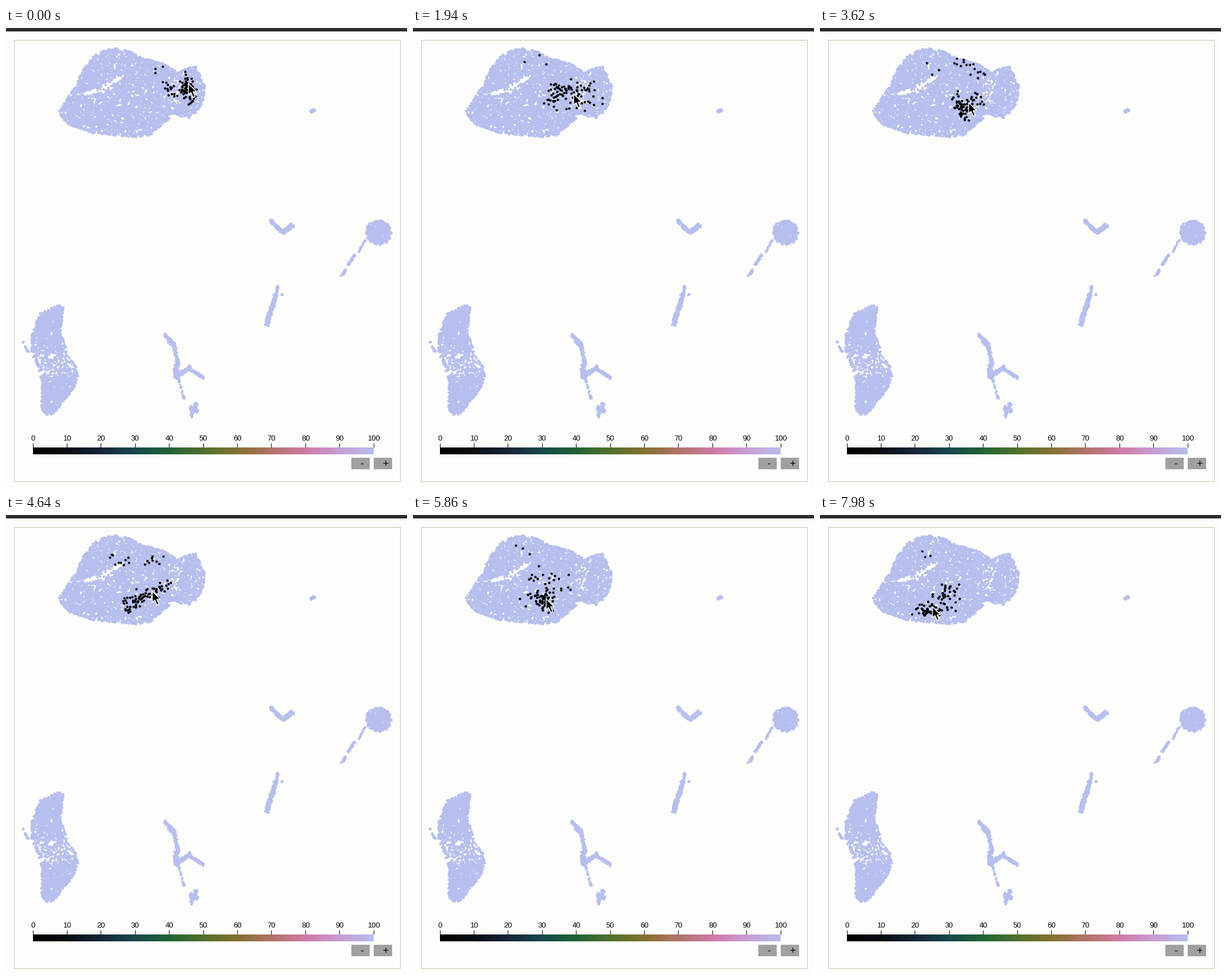
Animation, 699 px wide and 801 px high, one loop 8 s. Source, as a matplotlib script:

```python
import numpy as np
import matplotlib.pyplot as plt
from matplotlib.animation import FuncAnimation
from matplotlib.colors import LinearSegmentedColormap
from matplotlib.patches import Polygon, Rectangle
from matplotlib.path import Path

W, H, DPI = 699, 801, 64
PX = 72 / DPI
LOOP, TICK = 8000, 20
PAPER, CELL = "#fdfdfb", "#b6bfed"

rng = np.random.default_rng(11)


def fill(outline, n, density):
    """Random points inside a polygon, thinned by a density function."""
    pts = np.array(outline, float)
    xy = rng.uniform(pts.min(0), pts.max(0), (n, 2))
    xy = xy[Path(pts).contains_points(xy)]
    return xy[rng.random(len(xy)) < density(xy[:, 0], xy[:, 1])]


def dab(x0, y0, x1, y1, width):
    """Random points along a thick line, as many as its area asks for."""
    n = round(0.3 * width * (np.hypot(x1 - x0, y1 - y0) + 0.8 * width)) + 1
    u = rng.random((n, 1))
    angle = rng.uniform(0, 2 * np.pi, n)
    r = width / 2 * np.sqrt(rng.random(n))
    off = np.c_[r * np.cos(angle), r * np.sin(angle)]
    return (1 - u) * [x0, y0] + u * [x1, y1] + off


def dip(x, y, cx, cy, length, thick, tilt):
    a = np.radians(tilt)
    u = (x - cx) * np.cos(a) + (y - cy) * np.sin(a)
    v = (y - cy) * np.cos(a) - (x - cx) * np.sin(a)
    return np.exp(-((u / length) ** 2 + (v / thick) ** 2) ** 2)


def island_density(x, y):
    gap = dip(x, y, 150, 111, 28, 6, -12) + dip(x, y, 188, 92, 27, 6, -35)
    thin = 0.55 * dip(x, y, 296, 108, 11, 34, 12)
    return 1 - np.clip(0.95 * gap + thin, 0, 0.96)


def left_density(x, y):
    return np.interp(y, [535, 578, 600, 612], [1, 0.3, 0.36, 1])


island = fill(
    [(90, 146), (122, 99), (132, 73), (151, 49), (173, 37), (190, 35), (214, 39),
     (235, 51), (277, 62), (300, 77), (314, 69), (331, 66), (346, 99), (345, 122),
     (335, 145), (318, 157), (292, 151), (250, 187), (222, 190), (150, 183),
     (106, 167)], 8200, island_density)

left = fill(
    [(100, 487), (92, 482), (59, 498), (44, 535), (43, 562), (52, 588), (62, 613),
     (61, 665), (69, 674), (82, 674), (117, 630), (125, 608), (121, 587), (109, 574),
     (95, 530)], 4600, left_density)

strokes = [
    (29, 547, 38, 565, 2), (275, 533, 281, 540, 4), (283, 543, 293, 554, 8),
    (293, 555, 299, 588, 6), (296, 590, 297, 610, 9), (300, 606, 320, 591, 7),
    (318, 594, 344, 610, 5), (300, 612, 311, 650, 2), (331, 655, 322, 677, 6),
    (322, 662, 332, 668, 8), (530, 147, 537, 142, 5), (460, 335, 477, 352, 6),
    (480, 354, 486, 358, 7), (488, 352, 498, 344, 8), (647, 356, 651, 357, 42),
    (625, 370, 614, 392, 2), (608, 396, 596, 412, 4), (591, 422, 585, 432, 4),
    (473, 450, 470, 464, 4), (470, 464, 464, 487, 7), (462, 488, 454, 517, 8),
    (480, 465, 487, 461, 1),
]
cells = np.vstack([island, left] + [dab(*s) for s in strokes])

# Pointer path and, for each stop, the bands in which neighbours are found.
TIMES = np.array([0, 1940, 3620, 4640, 5860, 6880, 7980])
TIPS = np.array([(318, 97), (280, 115), (259, 130), (255, 133),
                 (232, 146), (211, 158), (196, 160)], float)
COUNTS = (50, 28, 16)
BANDS = np.array([
    [(306, 100, 322, 112), (318, 80, 324, 132), (272, 84, 298, 122)],
    [(236, 117, 284, 112), (240, 102, 312, 106), (243, 136, 326, 126)],
    [(240, 132, 256, 148), (236, 120, 284, 126), (240, 58, 290, 84)],
    [(208, 160, 255, 134), (238, 144, 280, 120), (195, 82, 285, 80)],
    [(228, 140, 230, 160), (195, 150, 266, 128), (198, 108, 255, 108)],
    [(190, 170, 242, 172), (185, 162, 238, 150), (190, 118, 234, 126)],
    [(172, 167, 205, 166), (195, 152, 232, 126), (205, 165, 240, 150)],
], float)


def nearest(xy):
    d = ((np.atleast_2d(xy)[:, None] - island[None]) ** 2).sum(2)
    return d.argmin(1)


def step_time(t):
    """Updates come in threes, 20 ms apart, every 140 ms."""
    return t - max(0, (t + 20) % 140 - 40)


def blend(values, t):
    i = min(np.searchsorted(TIMES, t, side="right") - 1, len(TIMES) - 2)
    u = (t - TIMES[i]) / (TIMES[i + 1] - TIMES[i])
    return values[i] * (1 - u) + values[i + 1] * u


def neighbours(t, cell):
    pick = np.random.default_rng(int(cell))
    xy = []
    for (x0, y0, x1, y1), n in zip(blend(BANDS, t), COUNTS):
        u = pick.random((n, 1))
        xy.append((1 - u) * [x0, y0] + u * [x1, y1] + pick.normal(0, 6.5, (n, 2)))
    # A few strays towards the upper edge
    far = np.interp(t, [0, 1940], [265, 205])
    xy.append([far, 65] + pick.normal(0, 1, (3, 2)) * [18, 8] - [20 * t / LOOP, 0])
    return island[np.unique(nearest(np.vstack(xy)))]


def build_states():
    states, last, cell, near = [], None, None, None
    for t in range(0, LOOP, TICK):
        s = step_time(t)
        if s != last:
            tip = np.round(blend(TIPS, s))
            hovered = nearest(tip)[0]
            if hovered != cell or s in TIMES:
                cell, near = hovered, neighbours(s, hovered)
            last = s
        states.append((tip, near))
    return states


STATES = build_states()

fig = plt.figure(figsize=(W / DPI, H / DPI), dpi=DPI, facecolor=PAPER)
ax = fig.add_axes([0, 0, 1, 1])
ax.axis("off")


def box(x, y, w, h, color):
    ax.add_patch(Rectangle((x, y), w, h, fc=color, lw=0))


def label(x, y, text, size):
    ax.text(x, y, text, family="Liberation Sans", fontsize=size * PX,
            ha="center", va="baseline", color="black")


box(0, 0, W, 6, "#2d2d2d")
ax.add_patch(Rectangle((13.5, 20.5), 673, 770, fill=False, ec="#c3c9b0", lw=PX))

# Colour scale
stops = ["#000000", "#090d11", "#16243a", "#18484c", "#206434", "#50702e",
         "#847030", "#b07468", "#d07aa6", "#c89cd4", CELL]
cmap = LinearSegmentedColormap.from_list("scale", stops, 594)
ax.imshow(np.linspace(0, 1, 594)[None], cmap=cmap, extent=(47, 641, 744, 732),
          aspect="auto", interpolation="nearest")
for k in range(11):
    x = 47 + 59.4 * k
    box(int(x), 725, 1, 7, "black")
    label(x, 720, str(10 * k), 13)

for x, sign in ((602, "-"), (641, "+")):
    box(x, 750, 32, 20, "#a0a0a0")
    label(x + (18 if sign == "-" else 20), 766, sign, 18)

dots = dict(ls="", marker="o", ms=4.2 * PX, mew=0)
ax.plot(cells[:, 0], cells[:, 1], color=CELL, **dots)
marked, = ax.plot([], [], color="black", **dots)

ARROW = np.array([(0, 0), (0, 19.5), (4.4, 15.4), (8, 24), (11.6, 22.5),
                  (8, 14.2), (14, 14)])
pointer = Polygon(ARROW, closed=True, fc="black", ec="white", lw=1.5 * PX,
                  joinstyle="miter", zorder=5)
ax.add_patch(pointer)
ax.set_xlim(0, W)
ax.set_ylim(H, 0)


def update(i):
    tip, near = STATES[i]
    marked.set_data(near[:, 0], near[:, 1])
    pointer.set_xy(ARROW + tip)
    return marked, pointer


anim = FuncAnimation(fig, update, frames=LOOP // TICK, interval=TICK,
                     init_func=lambda: update(0), repeat=True, repeat_delay=0, blit=False)
plt.show()
```
